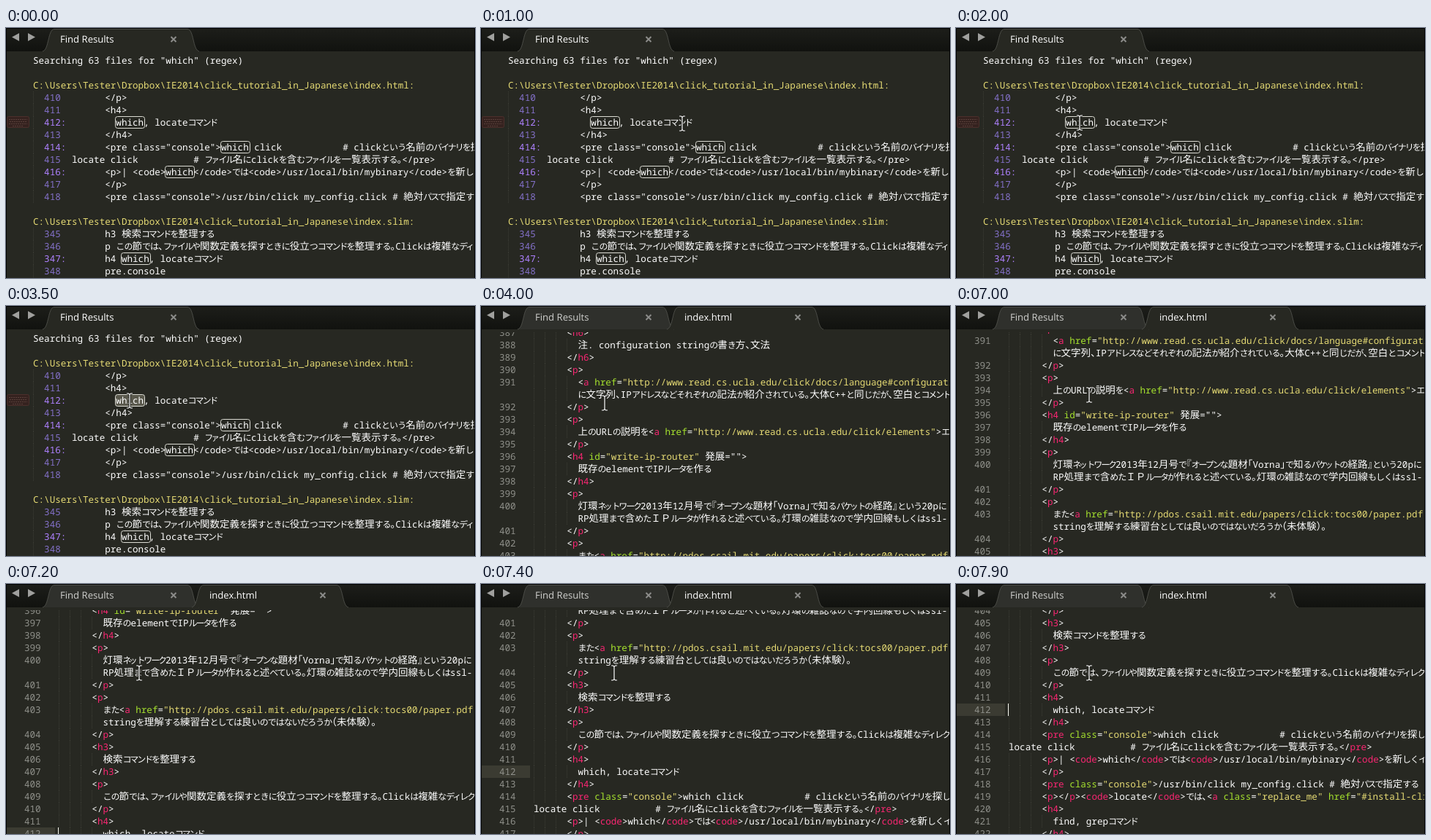
Animation, 641 px wide and 343 px high, one loop 8 s. Source, as an HTML page:

```html
<!DOCTYPE html>
<html lang="ja">
<head>
<meta charset="utf-8">
<title>Find Results</title>
<style>
  html, body { margin: 0; width: 100%; height: 100%; overflow: hidden; background: #272822; }
  svg { display: block; width: 100%; height: 100%; }
  text { white-space: pre; text-rendering: geometricPrecision; text-spacing-trim: space-all; }
  .code { font: 12.6px "Noto Sans Mono", monospace; fill: #fff; }
  .han, .hira, .kata, .small, .punct { font-family: "Noto Sans CJK JP", "Noto Sans CJK", sans-serif; font-weight: 500; }
  .han, .punct { font-size: 13.5px; }
  .hira { font-size: 12px; letter-spacing: -.95px; }
  .kata { font-size: 12px; letter-spacing: -2.1px; }
  .small { font-size: 11.5px; font-feature-settings: "palt"; }
  .punct { font-feature-settings: "halt"; }
  .tag { fill: #f92672; }
  .attr { fill: #a6e22e; }
  .str { fill: #e6db74; }
  .num { fill: #8f908a; }
  .ctx { fill: #8370c8; }
  .hit { fill: #ae81ff; }
  .guide { stroke: #3c3d35; stroke-dasharray: 1 1; }
  .box { fill: none; stroke: #dcdcd4; }
  .title { font: 13.1px "Open Sans", sans-serif; }
  .close { stroke: #8c8c8a; stroke-width: 2; }
</style>
</head>
<body>
<svg id="stage" viewBox="0 0 641 343" preserveAspectRatio="none">
  <defs>
    <linearGradient id="bar" x2="0" y2="1">
      <stop offset="0" stop-color="#1d1e1a"/><stop offset="1" stop-color="#11120f"/>
    </linearGradient>
    <clipPath id="pane"><rect y="36" width="641" height="307"/></clipPath>
  </defs>
  <rect width="641" height="343" fill="#272822"/>
  <g clip-path="url(#pane)">
    <g id="find"></g>
    <g id="editor"></g>
  </g>
  <rect width="641" height="32" fill="url(#bar)"/>
  <path d="M18 7V18L8 12.5ZM30 7V18L40 12.5Z" fill="#a0a09e"/>
  <g id="tabs"></g>
  <g id="cursor" fill="none">
    <path id="beam" d="M-4 -10H-1.5L0 -8.5L1.5 -10H4M0 -8.5V8.5M-4 10H-1.5L0 8.5L1.5 10H4"/>
    <use href="#beam" stroke="#20211c" stroke-width="3.2"/>
    <use href="#beam" stroke="#fff" stroke-width="1.2"/>
  </g>
  <path d="M.5 343V.5H640.5V343" fill="none" stroke="#000"/>
</svg>
<script>
const $ = id => document.getElementById(id);
const ROW = 17, CHAR = 7.56, LOOP = 8000;

function add(parent, tag, attrs = {}, content) {
  const node = document.createElementNS("http://www.w3.org/2000/svg", tag);
  for (const key in attrs) node.setAttribute(key, attrs[key]);
  if (content) node.textContent = content;
  return parent.appendChild(node);
}

// Each script run gets its own class, as kana are set tighter than kanji.
const RUNS = /([ -~]+)|([ぁ-ゖ]+)|([ァェッ]+)|((?:(?![ァェッ])[ァ-ヺー])+)|([、。「」『』（）]+)|([^ -~ぁ-ゖァ-ヺー、。「」『』（）]+)/g;
const SCRIPTS = ["latin", "hira", "small", "kata", "punct", "han"];

function write(text, string, color = "") {
  for (const m of string.matchAll(RUNS)) {
    const script = SCRIPTS[m.slice(1).findIndex(Boolean)];
    add(text, "tspan", { class: `${script} ${color}` }, m[0]);
  }
}

function line(parent, x, top, string, color) {
  const text = add(parent, "text", { class: "code", x, y: top + 13 });
  if (string) write(text, string, color);
  return text;
}

function writeHtml(text, string) {
  const tokens = /(?<=<\/?)(?<tag>\w+)|(?<attr>\w+)(?=="[^"])|(?<str>"[^">]+"?)/g;
  let at = 0;
  for (const m of string.matchAll(tokens)) {
    write(text, string.slice(at, m.index));
    write(text, m[0], Object.keys(m.groups).find(k => m.groups[k]));
    at = m.index + m[0].length;
  }
  write(text, string.slice(at));
}

function guide(parent, x, top) {
  const px = Math.round(x) + .5;
  add(parent, "path", { class: "guide", d: `M${px} ${top}v${ROW}` });
}

const RESULTS = String.raw`Searching 63 files for "which" (regex)

C:\Users\Tester\Dropbox\IE2014\click_tutorial_in_Japanese\index.html:
  410        </p>
  411        <h4>
  412:         which, locateコマンド
  413        </h4>
  414:       <pre class="console">which click           # clickという名前のバイナリを探し、
  415  locate click          # ファイル名にclickを含むファイルを一覧表示する。</pre>
  416:       <p>| <code>which</code>では<code>/usr/local/bin/mybinary</code>を新しくインストール
  417        </p>
  418        <pre class="console">/usr/bin/click my_config.click # 絶対パスで指定する

C:\Users\Tester\Dropbox\IE2014\click_tutorial_in_Japanese\index.slim:
  345        h3 検索コマンドを整理する
  346        p この節では、ファイルや関数定義を探すときに役立つコマンドを整理する。Clickは複雑なディレクトリ
  347:       h4 which, locateコマンド
  348        pre.console`;

// A leading + marks a soft-wrapped continuation.
const SOURCE = `      <h6>
        注. configuration stringの書き方、文法
      </h6>
      <p>
        <a href="http://www.read.cs.ucla.edu/click/docs/language#configuration">
+        に文字列、IPアドレスなどそれぞれの記法が紹介されている。大体C++と同じだが、空白とコメント
      </p>
      <p>
        上のURLの説明を<a href="http://www.read.cs.ucla.edu/click/elements">エレメント
      </p>
      <h4 id="write-ip-router" 発展="">
        既存のelementでIPルータを作る
      </h4>
      <p>
        灯環ネットワーク2013年12月号で『オープンな題材「Vorna」で知るパケットの経路』という20pに
+        RP処理まで含めたＩＰルータが作れると述べている。灯環の雑誌なので学内回線もしくはssl-
      </p>
      <p>
        また<a href="http://pdos.csail.mit.edu/papers/click:tocs00/paper.pdf">
+        stringを理解する練習台としては良いのではないだろうか（未体験）。
      </p>
      <h3>
        検索コマンドを整理する
      </h3>
      <p>
        この節では、ファイルや関数定義を探すときに役立つコマンドを整理する。Clickは複雑なディレクトリ
      </p>
      <h4>
        which, locateコマンド
      </h4>
      <pre class="console">which click           # clickという名前のバイナリを探し、
locate click          # ファイル名にclickを含むファイルを一覧表示する。</pre>
      <p>| <code>which</code>では<code>/usr/local/bin/mybinary</code>を新しくインストール
      </p>
      <pre class="console">/usr/bin/click my_config.click # 絶対パスで指定する
      <p></p><code>locate</code>では、<a class="replace_me" href="#install-click">
      <h4>
        find, grepコマンド
      </h4>`;

let selection, caret;

function buildFind() {
  const view = $("find"), left = 37;
  // Dim keyboard badge in the gutter.
  add(view, "rect", { x: 1.5, y: 121.5, width: 30, height: 15, rx: 2, fill: "#35221f", stroke: "#4c302c" });
  add(view, "path", { d: "M4 125.5H29M5 128.5H29M4 131.5H29M9 134.5H24", stroke: "#59403b", "stroke-dasharray": "2 1" });
  RESULTS.split("\n").forEach((row, i) => {
    const top = 36 + i * ROW;
    const head = row.match(/^  \d+(:?)/);
    if (!head) return line(view, left, top, row, row.startsWith("C:") ? "str" : "");
    guide(view, left, top);
    if (head[1]) {
      const x = left + row.indexOf("which") * CHAR;
      const word = { x: Math.round(x) - .5, y: top + .5, width: 40, height: 16, rx: 3 };
      if (!selection) selection = add(view, "rect", { ...word, fill: "#5a594d" });
      add(view, "rect", { ...word, class: "box" });
    }
    const text = line(view, left, top, head[0], head[1] ? "hit" : "ctx");
    write(text, row.slice(head[0].length));
  });
}

function buildEditor() {
  const view = $("editor"), left = 72;
  let number = 387;
  SOURCE.split("\n").forEach((raw, i) => {
    const top = 28 + i * ROW;
    const wrapped = raw[0] === "+";
    const row = wrapped ? raw.slice(1) : raw;
    if (number === 412 && !wrapped) {
      add(view, "rect", { y: top, width: 67, height: ROW, fill: "#3b3b32" });
      caret = add(view, "rect", { x: 71, y: top, width: 1, height: ROW, fill: "#f8f8f0" });
    }
    if (!wrapped) line(view, 25, top, String(number++), "num");
    const indent = row.search(/\S/);
    for (let col = 0; col < indent; col += 2) guide(view, left + col * CHAR, top);
    writeHtml(line(view, left, top), row);
  });
}

function buildTab(x, label) {
  const tab = add($("tabs"), "g", { transform: `translate(${x})` });
  const shape = add(tab, "path", {
    d: "M0 32C9 30 7 2 16 1.5H198C207 2 205 30 214 32", stroke: "#4c4d48"
  });
  const title = add(tab, "text", { class: "title", x: 24, y: 20 }, label);
  add(tab, "path", { class: "close", d: "M175.5 12l7 7m0 -7l-7 7" });
  return {
    tab,
    activate(on) {
      shape.setAttribute("fill", on ? "#272822" : "#2f302c");
      title.setAttribute("fill", on ? "#fff" : "#cfcfcd");
    }
  };
}

const show = (node, on) => node.setAttribute("visibility", on ? "visible" : "hidden");
const clamp = v => Math.min(1, Math.max(0, v));

// Later stops of the pointer: time, x, y.
const STOPS = [
  [1600, 238, 139], [1700, 212, 133], [1800, 184, 123], [1900, 171, 126],
  [2000, 169, 130], [4000, 169, 133], [6600, 177, 124], [6700, 182, 122]
];

function pointer(t) {
  const stop = STOPS.findLast(s => t >= s[0]);
  if (stop) return stop.slice(1);
  const p = 1 - (1 - clamp((t - 400) / 800)) ** 2;
  return [599 - 346 * p, 43 + 94 * p];
}

buildFind();
buildEditor();
const findTab = buildTab(50, "Find Results");
const fileTab = buildTab(254, "index.html");

function draw(now) {
  const t = Math.floor(now % LOOP / 100) * 100;
  const opened = t >= 4000;

  $("find").style.display = opened ? "none" : "";
  $("editor").style.display = opened ? "" : "none";
  fileTab.tab.style.display = opened ? "" : "none";
  findTab.activate(!opened);
  fileTab.activate(true);
  show(selection, t >= 3500);

  const scroll = 170 * clamp((t - 6900) / 300) + 170 * clamp((t - 7200) / 400);
  $("editor").setAttribute("transform", `translate(0 ${-Math.round(scroll)})`);
  show(caret, t < 7400 || t >= 7900);

  const [x, y] = pointer(t);
  show($("cursor"), t >= 400);
  $("cursor").setAttribute("transform", `translate(${Math.round(x)} ${Math.round(y)})`);
}

const start = performance.now();
function tick() {
  draw(performance.now() - start);
  requestAnimationFrame(tick);
}
tick();
</script>
</body>
</html>
```
